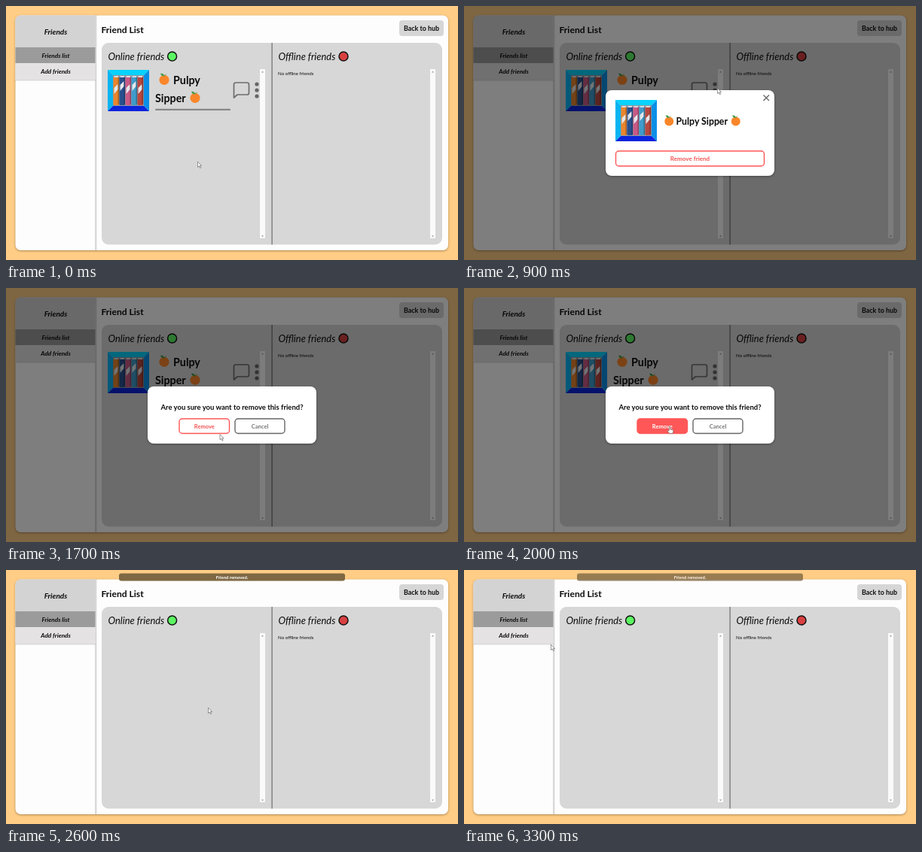
Animation, 600 px wide and 338 px high, one loop 3400 ms. Source, as an HTML page:

```html
<!DOCTYPE html>
<html lang="en">
<head>
<meta charset="utf-8">
<title>Friend list</title>
<style>
html, body { margin: 0; width: 100%; height: 100%; overflow: hidden; background: #ffcd85; }
svg { display: block; width: 600px; height: 338px; }
text { font-family: Lato, "Open Sans", sans-serif; font-weight: 700; fill: #0c0c0c; }
.mid { text-anchor: middle; }
.it { font-style: italic; }
.thin { font-weight: 400; }
.card { filter: drop-shadow(0 1px 1.5px #0005); }
.btn rect { fill: #fff; stroke: #ff5757; stroke-width: 1.4; }
.btn text { fill: #f25252; }
.btn.on rect { fill: #ff5757; }
.btn.on text { fill: #fff; }
.btn.plain rect { stroke: #666; }
.btn.plain text { fill: #777; }
#dots { fill: #666; }
#dots.on { fill: #000; }
</style>
</head>
<body>
<svg viewBox="0 0 600 338">
  <defs>
    <clipPath id="round"><rect x="12.5" y="12.5" width="574.5" height="312.5" rx="7"/></clipPath>
    <linearGradient id="edge"><stop stop-color="#0004"/><stop offset="1" stop-color="#0000"/></linearGradient>
    <symbol id="orange" viewBox="0 0 16 16" overflow="visible">
      <circle cx="8" cy="9.3" r="6.6" fill="#f9862a"/>
      <path d="M8 4.5C5.5 4.5 3.5 3 3 .8 6 .2 8 1.8 8 4.5 8.3 2.8 9.5 1.8 11 1.5" fill="#3f9a45"/>
    </symbol>
    <symbol id="avatar" viewBox="0 0 55 55">
      <path d="M0 0H55L47 8H8z" fill="#08d2fb"/>
      <path d="M0 0 8 8V47L0 55z" fill="#08b4f2"/>
      <path d="M55 0V55L47 47V8z" fill="#0a8fe6"/>
      <path d="M0 55 8 47H47L55 55z" fill="#0a24dc"/>
      <rect x="7" y="7" width="41" height="41" fill="#8d98a6"/>
      <g id="cans"></g>
    </symbol>
    <symbol id="bar" overflow="visible">
      <rect y="84" width="7" height="225" fill="#fafafa"/>
      <path d="M2 88.5 3.5 86.5 5 88.5zM2 305.5 3.5 307.5 5 305.5z" fill="#999"/>
    </symbol>
  </defs>

  <rect width="600" height="338" fill="#ffcd85"/>
  <rect class="card" x="12.5" y="12.5" width="574.5" height="312.5" rx="7" fill="#fdfdfd"/>
  <g clip-path="url(#round)">
    <rect x="118.5" y="12" width="2.5" height="314" fill="url(#edge)"/>
    <rect x="12" y="12" width="106.5" height="43" fill="#d3d3d3"/>
    <rect x="12" y="55" width="106.5" height="21" fill="#9b9b9b"/>
    <rect x="12" y="76" width="106.5" height="22" fill="#e4e2e3"/>
    <rect x="12" y="98" width="106.5" height="1.5" fill="#0002"/>
  </g>
  <text class="mid it" x="66" y="38" font-size="10">Friends</text>
  <text class="mid it" x="66" y="69" font-size="8.2">Friends list</text>
  <text class="mid it" x="66" y="90" font-size="8.2">Add friends</text>
  <text x="126.5" y="35.5" font-size="12.1">Friend List</text>
  <rect x="522" y="19" width="59" height="21" rx="4" fill="#d6d6d6"/>
  <text class="mid" x="551.5" y="33" font-size="8.9">Back to hub</text>

  <rect x="127" y="49" width="452" height="268.5" rx="9" fill="#d7d7d7"/>
  <rect x="352.3" y="49" width="1.7" height="268.5" fill="#8c8c8c"/>
  <text class="it thin" x="135.5" y="71.5" font-size="12.9">Online friends</text>
  <text class="it thin" x="361.5" y="71.5" font-size="12.9">Offline friends</text>
  <circle cx="220.6" cy="67" r="6" fill="#5cf563" stroke="#111" stroke-width="1.5"/>
  <circle cx="448" cy="67" r="6" fill="#d84141" stroke="#111" stroke-width="1.5"/>
  <text class="thin" x="361" y="92" font-size="6.2">No offline friends</text>
  <use href="#bar" x="337"/>
  <use href="#bar" x="563"/>

  <g id="friend">
    <use href="#avatar" x="135" y="85" width="55" height="55"/>
    <use href="#orange" x="202" y="89" width="16" height="16"/>
    <text x="222" y="103.7" font-size="14.3">Pulpy</text>
    <text x="198" y="127.7" font-size="14.3">Sipper</text>
    <use href="#orange" x="243" y="113" width="16" height="16"/>
    <rect x="198" y="136.8" width="100" height="2.2" rx="1" fill="#888"/>
    <path d="M305 102H320Q322.500 102 322.500 104.500V115.500Q322.500 118 320 118H307L302.500 122V104.500Q302.500 102 305 102z"
      fill="none" stroke="#6e6e6e" stroke-width="1.7" stroke-linejoin="round"/>
    <g id="dots">
      <circle cx="333" cy="104" r="2.6"/><circle cx="333" cy="112" r="2.6"/><circle cx="333" cy="120" r="2.6"/>
    </g>
  </g>

  <rect id="shade" width="600" height="338" opacity=".5"/>

  <g id="profile">
    <rect class="card" x="188" y="112" width="224" height="114" rx="8" fill="#fff"/>
    <path d="M397.500 118.500 405 126M405 118.500 397.500 126" stroke="#666" stroke-width="1.4"/>
    <use href="#avatar" x="201" y="125" width="55" height="55"/>
    <use href="#orange" x="265" y="145" width="14.5" height="14.5"/>
    <text x="281.5" y="158" font-size="12.3">Pulpy Sipper</text>
    <use href="#orange" x="353.5" y="145" width="14.5" height="14.5"/>
    <g id="unfriend" class="btn">
      <rect x="201.5" y="193" width="197" height="20" rx="4"/>
      <text class="mid" x="300" y="206" font-size="8.1">Remove friend</text>
    </g>
  </g>

  <g id="confirm">
    <rect class="card" x="188" y="131" width="224" height="76" rx="8" fill="#fff"/>
    <text class="mid" x="300" y="162" font-size="9.5">Are you sure you want to remove this friend?</text>
    <g id="remove" class="btn">
      <rect x="230" y="174" width="66.5" height="19.5" rx="4"/>
      <text class="mid" x="263.3" y="186.7" font-size="7.5">Remove</text>
    </g>
    <g class="btn plain">
      <rect x="304" y="174" width="66" height="19.5" rx="4"/>
      <text class="mid" x="337" y="186.7" font-size="7.6">Cancel</text>
    </g>
  </g>

  <g id="toast">
    <rect x="150" y="4.5" width="300" height="10" rx="3" fill="#7f6844"/>
    <text class="mid" x="300" y="11.5" font-size="5.9" style="fill:#fff">Friend removed.</text>
  </g>

  <g id="cursor" fill="#fff" stroke="#555" stroke-width=".6" stroke-linejoin="round">
    <path id="arrow" d="M.5 .3V7.5L2.2 6 3.5 8.8 4.6 8.3 3.4 5.6H5.6z"/>
    <path id="hand" d="M-.8 .8Q0-.3 .8 .8V4L4 4.6Q5 5 4.8 6.5L4 9.5H-.5L-2.8 6.2Q-2.6 5-.8 6z"/>
  </g>
</svg>
<script>
const LOOP = 3400, STEP = 100;
const $ = id => document.getElementById(id);
const show = (id, on) => { $(id).style.display = on ? "" : "none"; };
const hover = (id, on) => $(id).classList.toggle("on", on);

// time, x, y
const path = [
  [0, 254, 207], [100, 258, 203], [400, 346, 114], [600, 336, 109], [900, 336, 109],
  [1300, 294, 205], [1500, 294, 205], [1900, 273, 184], [2300, 273, 184],
  [2600, 268, 183], [2700, 266, 184], [3100, 134, 116], [3300, 115, 99]
];

function pointer(t) {
  const i = path.findIndex(p => p[0] >= t);
  if (i < 1) return path[0].slice(1);
  const [t0, x0, y0] = path[i - 1], [t1, x1, y1] = path[i];
  const k = (t - t0) / (t1 - t0);
  return [x0 + (x1 - x0) * k, y0 + (y1 - y0) * k];
}

$("cans").innerHTML = ["#e8862e", "#28508f", "#c85a86", "#3f9ccb", "#b8473f"].map((c, i) => {
  const x = 7.5 + i * 8;
  return `<rect x="${x}" y="9" width="7.6" height="38" rx="1.5" fill="${c}"/>
    <rect x="${x + 1}" y="8" width="5.5" height="2" fill="#d5dbe0"/>
    <path d="M${x + 1} ${24 - i % 2 * 4}l5-5v7l-5 6z" fill="#e4e7ea"/>
    <rect x="${x + 6}" y="10" width="1.6" height="36" fill="#0004"/>`;
}).join("");

function draw(t) {
  const [x, y] = pointer(t);
  const profile = t >= 900 && t < 1600, confirm = t >= 1600 && t < 2600;
  const inside = (l, r, top, b) => x >= l && x <= r && y >= top && y <= b;
  const overUnfriend = profile && inside(201, 399, 192, 213);
  const overRemove = confirm && inside(229, 297, 173, 194);

  show("friend", t < 2600);
  show("shade", profile || confirm);
  show("profile", profile);
  show("confirm", confirm);
  show("toast", t >= 2600);
  $("toast").style.opacity = t < 3300 ? 1 : .8;

  hover("dots", t < 900 && inside(329, 342, 100, 124));
  hover("unfriend", overUnfriend);
  hover("remove", overRemove);

  show("hand", overUnfriend || overRemove);
  show("arrow", !overUnfriend && !overRemove);
  $("cursor").setAttribute("transform", `translate(${x} ${y})`);
}

const start = performance.now();
function tick() {
  const t = (performance.now() - start) % LOOP;
  draw(Math.floor(t / STEP) * STEP);
  requestAnimationFrame(tick);
}
tick();
</script>
</body>
</html>
```
